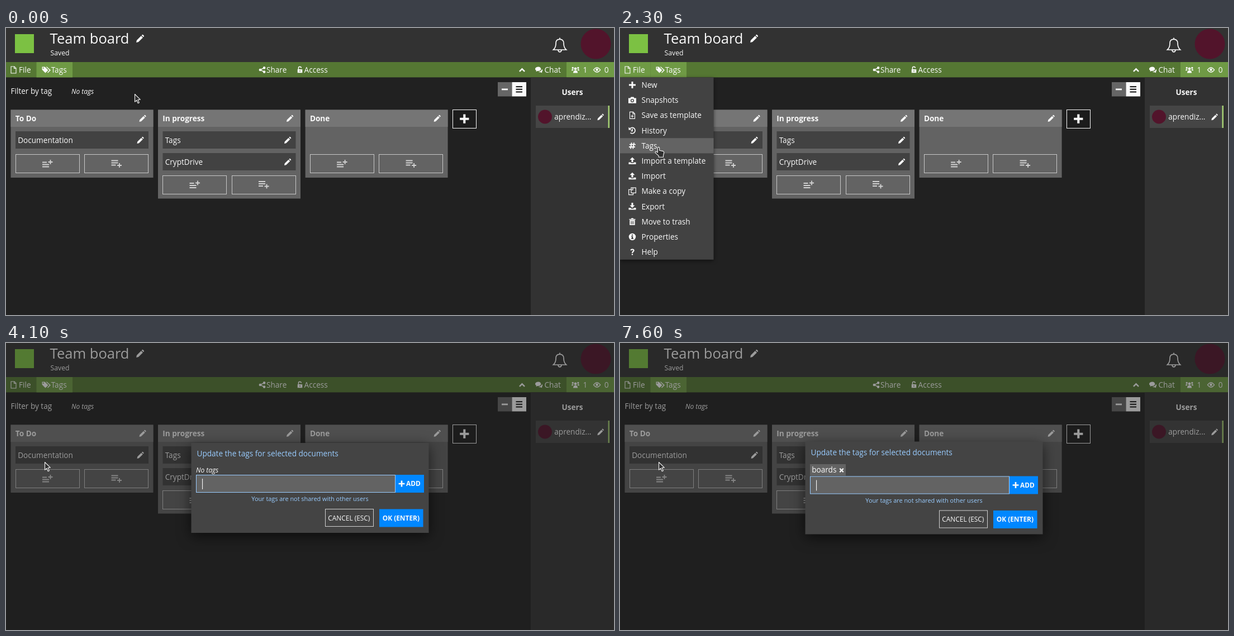
Recreate the animation shown at these times as an HTML page. Size 1088x514 px, loop 8 s.

```html
<!DOCTYPE html>
<html lang="en">
<head>
<meta charset="utf-8">
<title>Team board</title>
<style>
  html, body { margin: 0; width: 100%; height: 100%; overflow: hidden; background: #212121; }
  svg { display: block; width: 100vw; height: 100vh; }
  text { font: 13.6px "Open Sans", "Noto Sans", sans-serif; fill: #fafafa; white-space: pre; }
  .title { font-size: 25.5px; }
  .small { font-size: 12.2px; }
  .bold { font-weight: 700; }
  .none { font-size: 12px; font-style: italic; }
  .hint { font-size: 10.88px; fill: #99ccff; text-anchor: middle; }
  .button { font-size: 11.9px; }
  .heading { fill: #99ccff; }
  .tip { font-size: 15.3px; }
  .option { font-family: "Liberation Sans", Arial, sans-serif; }
  .line { fill: none; stroke: currentColor; stroke-width: 1.4; }
  .icon { fill: currentColor; fill-rule: evenodd; }
  .pointer { fill: #303030; stroke: #f4f4f4; stroke-width: 1.1; stroke-linejoin: round; }
</style>
</head>
<body>
<svg id="stage" viewBox="0 0 1088 514" preserveAspectRatio="none"></svg>
<script>
const LOOP = 8000, TICK = 100;
const ROW = 27.2, MENU_TOP = 88.4;

// Markup helpers
const rect = (x, y, w, h, fill, more = '') =>
  `<rect x="${x}" y="${y}" width="${w}" height="${h}" fill="${fill}" ${more}/>`;
const frame = (x, y, w, h, color, fill = 'none') =>
  rect(x + .5, y + .5, w - 1, h - 1, fill, `stroke="${color}"`);
const text = (x, y, s, cls = '', more = '') =>
  `<text x="${x}" y="${y}" class="${cls}" ${more}>${s}</text>`;
const circle = (x, y, r, fill) => `<circle cx="${x}" cy="${y}" r="${r}" fill="${fill}"/>`;
const dot = (x, y, r) => `M${x - r} ${y}a${r} ${r} 0 1 0 ${2 * r} 0a${r} ${r} 0 1 0 ${-2 * r} 0Z`;
const solid = d => `<path d="${d}"/>`;
const line = (d, w = 1.4) => `<path class="line" style="stroke-width:${w}" d="${d}"/>`;

// Icons, each centred on 0,0
const tray = 'M-6.5 2.5h4v1.5h5v-1.5h4v3.5h-13Z';
const icons = {
  pencil: solid('M-6 6L-5.3 2.6 1.6-4.3 4.3-1.6-2.6 5.3ZM2.4-5.1L3.3-6Q4-6.5 4.6-5.9L5.9-4.6Q6.4-4 5.9-3.3L5.1-2.4Z'),
  plus: solid('M-1.5-6h3v4.5h4.5v3h-4.5v4.5h-3v-4.5h-4.5v-3h4.5Z'),
  cross: solid('M-4-2.4L-2.4-4 0-1.6 2.4-4 4-2.4 1.6 0 4 2.4 2.4 4 0 1.6-2.4 4-4 2.4-1.6 0Z'),
  file: line('M-4.5-6H1.5L4.5-3V6H-4.5ZM1-6V-2.5H4.5', 1.1),
  tags: solid('M-8.5-5.5h5l6 6-5 5-6-6Z' + dot(-6.2, -3.2, 1.1) + 'M-1.5-5.5h1.8l6.7 6-5 5-1-1 3.8-4Z'),
  share: solid(dot(3.6, -3.6, 2.3) + dot(-3.6, 0, 2.3) + dot(3.6, 3.6, 2.3)) + line('M3.6-3.6L-3.6 0 3.6 3.6', 1.5),
  unlock: solid('M-4.5-.5h9v6.5h-9Z' + dot(0, 2.6, 1)) + line('M-2.7 0V-3a2.5 2.5 0 0 1 5 0', 1.6),
  up: line('M-4.6 2.4L0-2.2 4.6 2.4', 2.4),
  chat: solid('M-1.5-5.5c6.4 0 6.4 7.6 0 7.6q-1 0-1.6-.2-1.2 1-2.7 1.1 .8-.9.8-1.8c-4-2-1.600-6.700 3.500-6.700ZM5-1.500c2 2 1 4.200-.3 5q.1.900.8 1.700-1.500 0-2.600-1c-1.700.3-3.300 0-4.300-.9C2 3.400 4.700 1.500 5-1.500Z'),
  users: solid(dot(0, -2, 2.4) + dot(-4.8, -3.6, 1.700) + dot(4.8, -3.6, 1.700)
    + 'M-4 5.500q0-4.700 4-4.700t4 4.700ZM-7 1.200q0-2.700 2.400-2.700l1.200 1.500-1.200 1.200ZM7 1.200q0-2.700-2.400-2.700l-1.200 1.500 1.200 1.200Z'),
  eye: line('M-6 0Q0-8 6 0 0 8-6 0Z', 1.3) + solid(dot(0, -.3, 2.2)),
  bell: line('M-11.500 9Q-7 5-7-2.500C-7-7.500-4-9.800 0-9.800S7-7.500 7-2.500Q7 5 11.500 9ZM-3 9.500a3 3.300 0 0 0 6 0M0-10v-2.600', 1.7),
  addTop: line('M-9-2.500h8M-9 1.500h12M-9 5.500h12M5.500-7v8M1.500-3h8', 1.8),
  addEnd: line('M-9-5.500h12M-9-1.500h12M-9 2.500h8M5.500-1v8M1.500 3h8', 1.8),
  camera: solid('M-7-3.700h3.500l1-2.100h5l1 2.100H7V5.500H-7Z' + dot(0, .8, 3.1) + dot(0, .8, 1.700)),
  newFile: line('M-4.500-6H1.500L4.500-3V6H-4.500ZM1-6V-2.500H4.500M0-1V4M-2.500 1.500h5', 1.1),
  history: line('M-4.600-2.700A5.200 5.200 0 1 1-3.500 4M0-3V.8H-2.400', 1.7) + solid('M-6.500-6V-1H-1.500Z'),
  hash: line('M-1.200-5.500L-3 5.500M3-5.500L1.200 5.500M-5-2.200H6M-6 2.200H5', 1.9),
  upload: solid(tray + 'M0-6.500L4.500-2H1.500V2.500h-3V-2h-3Z'),
  download: solid(tray + 'M0 2.500L4.500-2H1.500V-6.500h-3V-2h-3Z'),
  copy: line('M-2-6.300H6.300V3H-2V-3.500ZM-2-3H-6.300V6.300H1.500V3M-2-2.500H1V-6.300', 1.2),
  trash: solid('M-5.500-4.800h3.200l.8-1.500h3l.8 1.500h3.200v1.400h-11ZM-4.700-2.700h9.400V6.300h-9.400ZM-2.600-1h1V4.700h-1ZM-.5-1h1V4.700h-1ZM1.600-1h1V4.700h-1Z'),
  info: solid(dot(0, 0, 6.200) + 'M-1.100-4.200h2.300v2h-2.300ZM-1.900-1.200h3.100v3.800h.9v1.400h-4v-1.400h.9v-2.400h-.9Z'),
  help: line('M-2.600-3C-2-5.300 3-5.200 2.600-2.500 2.400-.8 0-.6 0 1.700', 2.1) + solid('M-1.100 3.200h2.200v2.200h-2.200Z')
};
const icon = (name, x, y, size = 1, color = '#fafafa') =>
  `<g class="icon" color="${color}" transform="translate(${x} ${y}) scale(${size})">${icons[name]}</g>`;

function column(x, title, cards) {
  const bottom = cards.length > 1 ? 305.5 : 268, by = bottom - 42;
  const card = (name, i) => {
    const y = 185 + i * 39;
    return rect(x + 8.5, y, 238, 31, '#424242') + text(x + 12.7, y + 20.500, name) + icon('pencil', x + 232, y + 16);
  };
  return rect(x, 146.5, 255, bottom - 146.5, '#636363') + rect(x, 146.5, 255, 30.5, '#757575')
    + text(x + 8.3, 166.6, title, 'bold') + icon('pencil', x + 236, 162)
    + cards.map(card).join('')
    + frame(Math.round(x + 8.3), Math.round(by), 115, 34, '#c8c8c8') + icon('addTop', x + 65.5, by + 17, 1, '#d2d2d2')
    + frame(Math.round(x + 131.8), Math.round(by), 115, 34, '#c8c8c8') + icon('addEnd', x + 189, by + 17, 1, '#d2d2d2');
}

const header = rect(0, 0, 1088, 61, '#323232') + rect(16, 11, 34, 34, '#7cc143')
  + text(78.6, 28, 'Team board', 'title') + icon('pencil', 240, 19, 1.15)
  + text(79.6, 49.3, 'Saved', 'small') + icon('bell', 991, 30) + circle(1055.5, 28.500, 27, '#52142b');

const toolbar = rect(0, 61, 1088, 27.4, '#557733')
  + rect(0, 61, 54.5, 27.4, '#6f9a45', 'id="fileHover"')
  + rect(54.5, 61, 64.5, 27.4, '#6f9a45') + rect(1003, 61, 85, 27.4, '#6f9a45')
  + icon('file', 13.500, 75) + text(23, 79.900, 'File') + icon('tags', 73, 75) + text(80.7, 79.900, 'Tags')
  + icon('share', 458.500, 75) + text(466, 79.900, 'Share') + icon('unlock', 526, 74.500, .95) + text(533.6, 79.900, 'Access')
  + icon('up', 923.500, 75.500) + icon('chat', 954, 75) + text(963.5, 79.900, 'Chat')
  + icon('users', 1019, 75) + text(1032.500, 79.900, '1') + icon('eye', 1057.500, 75) + text(1070.700, 79.900, '0');

const filters = text(8.5, 118, 'Filter by tag') + text(117, 118, 'No tags', 'none')
  + rect(880, 97, 25.5, 25.5, '#666') + rect(887, 108.500, 11, 2.800, '#fafafa')
  + rect(905.5, 97, 25.5, 25.5, '#fafafa')
  + [104, 108.700, 113.400].map(y => rect(912.5, y, 11.5, 2.200, '#212121')).join('');

const board = column(8.5, 'To Do', ['Documentation']) + column(272, 'In progress', ['Tags', 'CryptDrive'])
  + column(535.6, 'Done', []) + frame(799, 146, 43, 34, '#fafafa', '#1c1c1c') + icon('plus', 820.3, 162.7, 1.35);

const sidebar = rect(939, 88.4, 149, 425.6, '#323232') + text(1013.5, 119.800, 'Users', 'bold', 'text-anchor="middle"')
  + rect(948, 139, 132, 40, '#454545') + rect(1077.4, 139, 2.600, 40, '#a3cc72')
  + circle(964.5, 159, 12.500, '#52142b') + text(981.3, 164, 'aprendiz...') + icon('pencil', 1064, 159.500, .95);

const entries = [['plus', 'New'], ['camera', 'Snapshots'], ['newFile', 'Save as template'], ['history', 'History'],
  ['hash', 'Tags'], ['upload', 'Import a template'], ['upload', 'Import'], ['copy', 'Make a copy'],
  ['download', 'Export'], ['trash', 'Move to trash'], ['info', 'Properties'], ['help', 'Help']];
const menu = `<g id="menu">${rect(0, 88.4, 167.5, 326.4, '#424242', 'style="filter:drop-shadow(0 2px 3px #0008)"')}`
  + rect(0, 0, 167.5, ROW, '#636363', 'id="rowHover"')
  + entries.map(([name, label], i) => {
      const y = MENU_TOP + (i + .5) * ROW;
      return icon(name, 22, y) + text(38.5, y + 5, label);
    }).join('') + '</g>';

const tip = `<g id="tip" opacity=".32">${rect(9, 231, 149, 34, '#333', 'rx="3"')}`
  + `<path d="M77 231L83.5 224.500 90 231Z" fill="#333"/>${text(17.5, 253.400, 'Tags (for you only)', 'tip')}</g>`;

const dialog = `<g id="dialog">
  <rect id="panel" x="331.5" width="425" fill="#444" style="filter:drop-shadow(0 6px 12px #0009)"/>
  ${text(341.5, 203, 'Update the tags for selected documents', 'heading', 'id="heading"')}
  ${text(340, 232, 'No tags', 'none', 'id="noTags"')}
  <g id="chip">${rect(340, 217, 64, 20.500, '#636363')}${text(343.2, 231.900, 'boards')}${icon('cross', 396.5, 228)}</g>
  <g id="form">
    ${frame(340, 236, 357, 32, '#99ccff', '#636363')}
    ${text(351, 257, '', '', 'id="entry"')}${rect(351, 243, 1.100, 19, '#fafafa', 'id="caret"')}
    ${rect(697, 236, 51, 32, '#0087ff')}${icon('plus', 708, 252, .9)}${text(716, 256.300, 'ADD', 'button bold')}
    ${text(544, 283, 'Your tags are not shared with other users', 'hint', 'id="hint"')}
    <g id="options">${frame(340, 268, 357, 22.500, '#777', '#1f1f1f')}
      ${frame(340, 268, 358, 23, '#339fff', '#0087ff').replace('<rect', '<rect id="picked"')}
      ${text(346.3, 284, 'boards', 'option')}</g>
    ${frame(571, 297, 87, 32, '#d0d0d0')}${text(576.3, 317.900, 'CANCEL (ESC)', 'button')}
    ${rect(668, 297.5, 78.5, 32, '#0087ff')}${text(673.7, 317.900, 'OK (ENTER)', 'button bold')}
  </g></g>`;

const pointers = {
  arrow: 'M.5.5V14.300L3.700 11.400 6.200 16.700 8.400 15.700 6 10.500 10.300 10.100Z',
  hand: 'M-1.600 1.300Q0-.6 1.600 1.300V6.200L8 7.600Q9.900 8.200 9.700 10.500L8.500 15.500V18.300H.2V15.800L-5.700 10.600Q-6.300 8-4 8.400L-1.600 10Z',
  grab: 'M-4 10V7.500L-9.500 1.600Q-10-.8-7.500-.3L-5 2V-5q0-2 1.500-2t1.500 2V-7.500q0-2 1.500-2t1.500 2V-6.500q0-2 1.500-2t1.500 2V-4q0-1.700 1.500-1.700t1.500 1.700V3L5 7.500V10Z'
};

const stage = document.getElementById('stage');
stage.innerHTML = rect(0, 0, 1088, 514, '#212121') + header + toolbar + filters + board + sidebar + menu + tip
  + rect(0, 0, 1088, 514, 'rgba(28,28,28,.43)', 'id="shade"') + dialog + '<path id="pointer" class="pointer"/>';

const el = {};
stage.querySelectorAll('[id]').forEach(node => el[node.id] = node);
const show = (node, on) => node.setAttribute('display', on ? 'inline' : 'none');
const set = (node, attrs) => Object.entries(attrs).forEach(([k, v]) => node.setAttribute(k, v));

// Timeline
const typing = [[0, ''], [4200, 'b'], [4400, 'bo'], [4600, 'boa'], [4700, 'boar'], [4900, 'board'], [6000, 'boards'], [6400, '']];
const caretOff = [[3500, 4100], [5400, 6000], [7000, 7600]];
const ease = p => p * p * (3 - 2 * p);
const clamp = p => Math.max(0, Math.min(1, p));
const glide = (a, b, p) => a.map((v, i) => v + (b[i] - v) * ease(clamp(p)));

function pointerAt(t) {
  if (t < 1200) return glide([230, 118], [38, 81], (t - 200) / 900 * (t >= 300));
  return glide([37, 80], [69, 213], (t - 1700) / 600 * (t >= 1800));
}

function draw(t) {
  const [x, y] = pointerAt(t);
  const open = t >= 1400 && t < 2800;
  const shape = t >= 2900 ? 'arrow' : t >= 2800 ? 'grab' : open || y < MENU_TOP ? 'hand' : 'arrow';
  set(el.pointer, { d: pointers[shape], transform: `translate(${x} ${y})` });

  show(el.fileHover, t < 2900 && (t >= 1400 || (x < 54.5 && y < MENU_TOP)));
  show(el.menu, open);
  const row = Math.floor((y - MENU_TOP) / ROW);
  show(el.rowHover, row >= 0);
  set(el.rowHover, { y: MENU_TOP + row * ROW });
  show(el.tip, t >= 2800 && t < 2900);

  const fade = clamp((t - 2800) / 300);
  set(el.shade, { opacity: fade });
  set(el.dialog, { opacity: fade });

  const tagged = t >= 6400, grow = tagged ? 2.5 : 0;
  set(el.panel, { y: 179 - grow, height: 161 + 2 * grow });
  set(el.heading, { y: 203 - grow });
  set(el.form, { transform: `translate(0 ${grow})` });
  show(el.noTags, !tagged);
  show(el.chip, tagged);

  const listed = t >= 4400 && t < 6400;
  show(el.options, listed);
  show(el.picked, t >= 6000);
  show(el.hint, !listed);
  el.entry.textContent = typing.filter(([at]) => t >= at).pop()[1];
  const width = el.entry.textContent ? el.entry.getComputedTextLength() : 0;
  set(el.caret, { x: 351 + Math.round(width) });
  show(el.caret, !caretOff.some(([a, b]) => t >= a && t < b));
}

const start = performance.now();
function tick() {
  const t = (performance.now() - start) % LOOP;
  draw(Math.floor(t / TICK) * TICK);
  requestAnimationFrame(tick);
}
tick();
</script>
</body>
</html>
```
